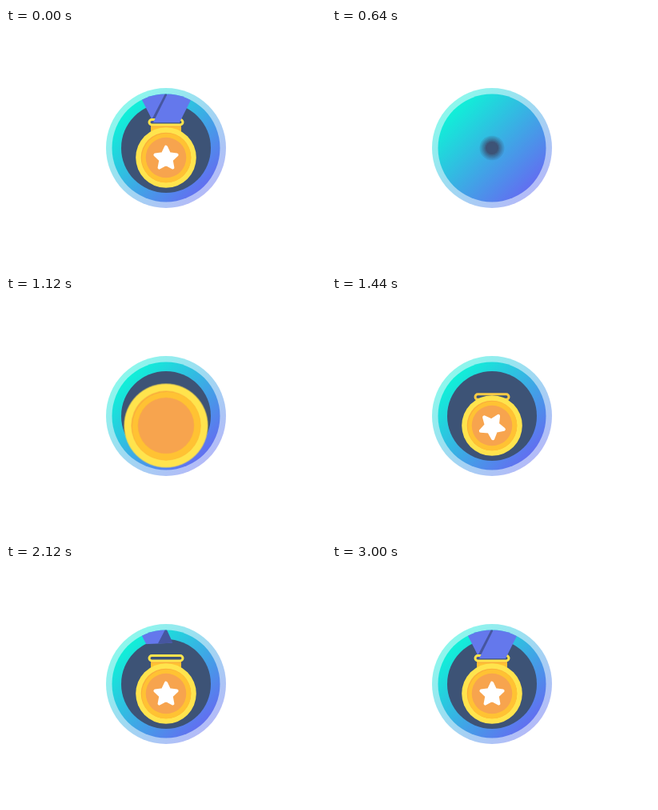
An HTML page with a canvas for the animation above (3.04 s loop, 400x300 px).

```html
<!DOCTYPE html>
<html lang="en">
<head>
<meta charset="utf-8">
<title>Medal badge</title>
<style>
  html, body { margin: 0; width: 100%; height: 100%; overflow: hidden; background: #fff; }
  canvas { display: block; width: 400px; height: 300px; }
</style>
</head>
<body>
<canvas id="stage" width="400" height="300"></canvas>
<script>
const ctx = document.getElementById('stage').getContext('2d');
const LOOP = 3040, STEP = 40, CX = 200, CY = 150, MY = 162;
const TEAL = '#11efd8', BLUE = '#6170f0', NAVY = '#3d5376';
const YELLOW = '#ffe44d', AMBER = '#ffc233', ORANGE = '#f7a44e';
const RIBBON = '#6478ec', SHADE = '#4656a0';

const unit = (t, a, b) => Math.min(1, Math.max(0, (t - a) / (b - a)));
const mix = (a, b, u) => a + (b - a) * u;
const inOut = u => (1 - Math.cos(Math.PI * u)) / 2;
const outCubic = u => 1 - (1 - u) ** 3;

// Grows from nothing to a peak, then settles at 1.
function pop(t, start, top, end, peak) {
  return t < top ? peak * inOut(unit(t, start, top))
                 : mix(peak, 1, inOut(unit(t, top, end)));
}

function circle(x, y, r, fill) {
  ctx.beginPath();
  ctx.arc(x, y, Math.max(0, r), 0, Math.PI * 2);
  ctx.fillStyle = fill;
  ctx.fill();
}

// Circle averaged over a short shutter time, for soft moving edges.
function softCircle(y, r, scale, t, fill) {
  const radii = [-12, -6, 0, 6, 12].map(d => r * scale(t + d)).sort((a, b) => b - a);
  if (radii[0] - radii[4] < 0.2) return circle(CX, y, radii[2], fill);
  radii.forEach((q, i) => {
    ctx.globalAlpha = 1 / (radii.length - i);
    circle(CX, y, q, fill);
  });
  ctx.globalAlpha = 1;
}

function poly(points, fill) {
  ctx.beginPath();
  points.forEach(([x, y]) => ctx.lineTo(x, y));
  ctx.closePath();
  ctx.fillStyle = fill;
  ctx.fill();
}

function blend(r) {
  const k = Math.max(1, r) * 0.7;
  const g = ctx.createLinearGradient(CX - k, CY - k, CX + k, CY + k);
  g.addColorStop(0, TEAL);
  g.addColorStop(1, BLUE);
  return g;
}

const rimScale = t => pop(t, 40, 320, 500, 1.067);
const faceScale = t => pop(t, 160, 420, 590, 1.06);
const holeScale = t => pop(t, 570, 810, 980, 1.05);
const coinScale = t => pop(t, 880, 1080, 1300, 1.42);

function badge(t) {
  const rim = 75 * rimScale(t);
  ctx.globalAlpha = 0.48;
  circle(CX, CY, rim, blend(rim));
  ctx.globalAlpha = 1;
  softCircle(CY, 67.5, faceScale, t, blend(67.5 * faceScale(t)));
  softCircle(CY, 56, holeScale, t, NAVY);
}

function clipFace() {
  ctx.beginPath();
  ctx.arc(CX, CY, 67.5, 0, Math.PI * 2);
  ctx.clip();
}

function backStrap(t) {
  const u = inOut(unit(t, 1880, 2360));
  if (!u) return;
  const y = mix(80, 118.5, u);
  ctx.save();
  clipFace();
  ctx.beginPath();
  ctx.moveTo(150, 70);
  ctx.lineTo(240, 70);
  ctx.lineTo(240, y - 4 * (1 - u));
  ctx.lineTo(150, y + 4 * (1 - u));
  ctx.clip();
  poly([[165, 80], [198, 80], [217.5, 118.5], [184.5, 118.5]], RIBBON);
  poly([[200, 80], [217.5, 118.5], [180, 118.5]], SHADE);
  ctx.restore();
}

function frontStrap(t) {
  const u = inOut(unit(t, 2320, 2800));
  if (!u) return;
  const y = mix(118, 80, u);
  ctx.save();
  clipFace();
  ctx.beginPath();
  ctx.rect(150, y, 100, 118 - y);
  ctx.clip();
  poly([[203, 80], [236, 80], [217, 118], [184, 118]], RIBBON);
  ctx.restore();
}

function loopTab(t) {
  if (t < 1320) return;
  const u = outCubic(unit(t, 1330, 1700));
  const drop = 24 * (1 - u);
  ctx.save();
  ctx.translate(0, drop);
  poly([[181, 120], [219, 120], [219, 136], [181, 136]], AMBER);
  poly([[181, 121.5], [219, 121.5], [219, 124], [181, 124]], '#f9b23c');
  ctx.beginPath();
  ctx.roundRect(179, 114.5, 42, 6.5, 3.2);
  ctx.lineWidth = 3;
  ctx.strokeStyle = `rgb(${mix(246, 255, u)}, ${mix(160, 228, u)}, ${mix(50, 77, u)})`;
  ctx.stroke();
  ctx.restore();
}

function coin(t) {
  const s = coinScale(t);
  softCircle(MY, 37.8, coinScale, t, YELLOW);
  softCircle(MY, 31.3, coinScale, t, '#faae3c');
  if (s > 0) {
    ctx.save();
    ctx.beginPath();
    ctx.arc(CX, MY, 31.3 * s, 0, Math.PI * 2);
    ctx.clip();
    circle(CX + s, MY + s, 31.3 * s, AMBER);
    ctx.restore();
  }
  softCircle(MY, 25.3, coinScale, t, ORANGE);
}

function star(t) {
  const s = pop(t, 1180, 1380, 1560, 1.08);
  if (!s) return;
  ctx.save();
  ctx.translate(CX, MY + 1);
  ctx.rotate(-1.2 * Math.PI * (1 - outCubic(unit(t, 1200, 1760))));
  ctx.scale(s, s);
  ctx.beginPath();
  for (let i = 0; i < 10; i++) {
    const r = i % 2 ? 7 : 14.3, a = i * Math.PI / 5;
    ctx.lineTo(r * Math.sin(a), -r * Math.cos(a));
  }
  ctx.closePath();
  ctx.lineJoin = 'round';
  ctx.lineWidth = 4;
  ctx.fillStyle = ctx.strokeStyle = '#fff';
  ctx.fill();
  ctx.stroke();
  ctx.restore();
}

function draw(now) {
  let t = Math.floor((now % LOOP) / STEP) * STEP;
  if (t < STEP) t = LOOP;   // the loop opens on the finished badge
  ctx.fillStyle = '#fff';
  ctx.fillRect(0, 0, 400, 300);
  badge(t);
  backStrap(t);
  loopTab(t);
  coin(t);
  star(t);
  frontStrap(t);
}

const begin = performance.now();
function tick() {
  draw(performance.now() - begin);
  requestAnimationFrame(tick);
}
tick();
</script>
</body>
</html>
```
